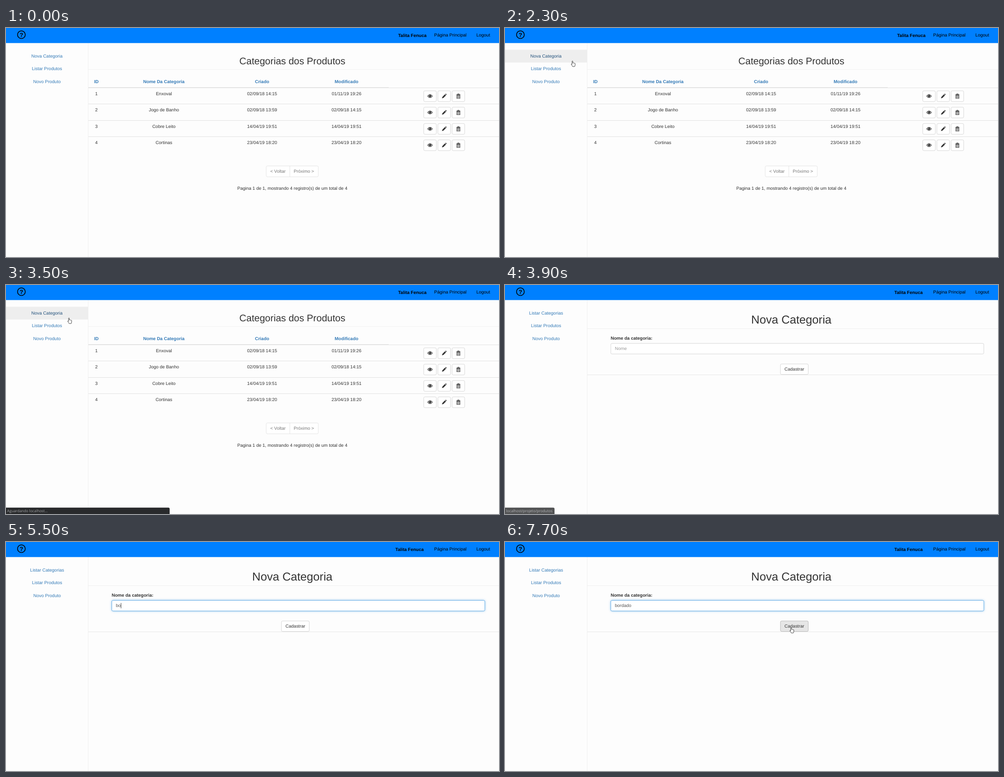
An HTML page for the animation above (8000 ms loop, 1095 px wide and 511 px high).

```html
<!DOCTYPE html>
<html lang="pt-BR">
<head>
<meta charset="utf-8">
<title>Categorias dos Produtos</title>
<style>
  html, body { margin: 0; width: 100%; height: 100%; overflow: hidden; background: #fdfdfd; }
  svg { display: block; width: 1095px; height: 511px; }
  text { font: 9.98px "Liberation Sans", Arial, sans-serif; fill: #333; text-rendering: geometricPrecision; white-space: pre; }
  .bold { font-weight: bold; }
  .mid { text-anchor: middle; }
  .link { fill: #337ab7; }
  .link.hover { fill: #23527c; }
  .nav { fill: #000; }
  .muted { fill: #777; }
  .h3 { font-size: 21.4px; }
  .h1 { font-size: 25.66px; }
  .box { fill: #fff; stroke: #ccc; stroke-width: .8; }
  .status { font: 8.2px "Open Sans", "Noto Sans", sans-serif; fill: #a4a6a9; }
  #focus { fill: #fff; stroke: #66afe9; filter: drop-shadow(0 0 2.8px rgba(102, 175, 233, .65)); }
</style>
</head>
<body>
<svg id="stage" viewBox="0 0 1095 511" xmlns="http://www.w3.org/2000/svg"></svg>
<script>
const LOOP = 8000, STEP = 100;

const text = (x, y, str, cls = '', id = '') =>
  `<text x="${x}" y="${y}" class="${cls}" id="${id}">${str}</text>`;
const rect = (x, y, w, h, attrs) =>
  `<rect x="${x}" y="${y}" width="${w}" height="${h}" ${attrs}/>`;
const box = (x, y, w, h, attrs = '') => rect(x, y, w, h, `rx="2.7" class="box" ${attrs}`);
const rule = (y, color, x = 182, w = 913, h = 1) => rect(x, y, w, h, `fill="${color}"`);

const sideLinks = (page, x, labels) => labels.map((label, i) =>
  rect(0, 48.5 + 28.5 * i, 182, 28.5, `fill="#eee" id="${page}Row${i}"`) +
  text(x, 65.7 + 28.5 * i, label, 'mid link', `${page}Link${i}`)).join('');

const icons = [
  `<path d="M-5.2 0Q0-7 5.2 0Q0 7-5.2 0Z" fill="#fff" stroke="#333" stroke-width="1.2"/>
   <circle r="2.7" cy="-.3" fill="#333"/><path d="M-1.4-.5Q-1.2-1.7 0-1.8" fill="none" stroke="#fff" stroke-width=".7"/>`,
  `<path d="M-5 5L-4 1.7L1.6-3.9L3.9-1.6L-1.7 4ZM2.3-4.6L3.1-5.3Q3.7-5.6 4.3-5L5-4.3Q5.6-3.7 5.2-3.1L4.6-2.3Z" fill="#333"/>`,
  `<path d="M-4.5-3.3H4.5M-1.6-3.6V-5H1.6V-3.6M-3.5-2.2V5H3.5V-2.2M-1.3-1.6V4M1.3-1.6V4M-3.5-2H3.5" fill="none" stroke="#333" stroke-width="1.1"/>`
];

const categories = [
  ['Enxoval', '02/09/18 14:15', '01/11/19 19:26'],
  ['Jogo de Banho', '02/09/18 13:59', '02/09/18 14:15'],
  ['Cobre Leito', '14/04/19 19:51', '14/04/19 19:51'],
  ['Cortinas', '23/04/19 18:20', '23/04/19 18:20']
];
const columns = [200.7, 350.7, 568.8, 756.3];
const cells = (values, y, cls) => values.map((v, i) => text(columns[i], y, v, cls)).join('');

const tableRow = (values, i) => {
  const y = 36.5 * i;
  const buttons = icons.map((icon, k) =>
    box(927.8 + 31.5 * k, 140.2 + y, 28, 24) +
    `<g transform="translate(${941.8 + 31.5 * k} ${152 + y})">${icon}</g>`).join('');
  return rule(133 + Math.floor(y), '#e1e1e1') + cells([i + 1, ...values], 149.7 + y, 'mid') + buttons;
};

const listPage = `<g id="list">
  ${sideLinks('list', 91, ['Nova Categoria', 'Listar Produtos', 'Novo Produto'])}
  ${text(871, 20, 'Talita Fenuca', 'bold nav')}
  ${text(636, 81.4, 'Categorias dos Produtos', 'mid h3')}
  ${rule(92, '#f1f1f1')}
  ${cells(['ID', 'Nome Da Categoria', 'Criado', 'Modificado'], 122.6, 'mid bold link')}
  ${categories.map(tableRow).join('')}
  ${rule(132.3, '#ddd', 182, 668, 1.4)}
  ${box(578, 307.8, 115.6, 24.2, 'style="stroke:#ddd"')}
  ${rule(308, '#ddd', 630, .8, 24)}
  ${text(587, 323.3, '&lt; Voltar', 'muted')}
  ${text(639, 323.3, 'Próximo &gt;', 'muted')}
  ${text(636, 360.8, 'Pagina 1 de 1, mostrando 4 registro(s) de um total de 4', 'mid')}
</g>`;

const formPage = `<g id="form">
  ${sideLinks('form', 91.3, ['Listar Categorias', 'Listar Produtos', 'Novo Produto'])}
  ${text(864.8, 20, 'Talita Fenuca', 'bold nav')}
  ${text(636, 86, 'Nova Categoria', 'mid h1')}
  ${rule(97, '#eee')}
  ${text(234.8, 122.3, 'Nome da categoria:', 'bold')}
  ${box(235, 130.3, 828.5, 23.6)}
  ${rect(235, 130.3, 828.5, 23.6, 'rx="2.7" id="focus"')}
  ${text(244, 145.3, '', '', 'field')}
  ${rect(244, 136, .9, 12, 'fill="#333" id="caret"')}
  ${rule(200, '#e6e6e6')}
  ${box(611.8, 176.2, 61.8, 23.4, 'id="submit"')}
  ${text(642.7, 190.8, 'Cadastrar', 'mid')}
</g>`;

const pointers = `
  <path id="arrow" d="M0 0V10L2.3 8L3.8 11.3L5.2 10.7L3.8 7.4H7Z" fill="#fff" stroke="#000" stroke-width=".7"/>
  <path id="hand" d="M-.9 1.2Q0-.5.9 1.2V5Q1.9 4.2 2.5 5.2Q3.6 4.5 4.1 5.6Q5.8 5 6 6.8V9Q5.9 10.8 4.9 13H.4Q-.8 10.8-2.5 8.6Q-3 7-1.8 7.2L-.9 8.2Z" fill="#fff" stroke="#222" stroke-width=".85"/>
  <path id="beam" d="M-2-5H2M0-5V5M-2 5H2" fill="none" stroke="#555" stroke-width=".7"/>`;

const stage = document.getElementById('stage');
stage.innerHTML = `
  ${rect(0, 0, 1095, 511, 'fill="#fdfdfd"')}
  ${listPage}${formPage}
  ${rule(34, '#f0f0f0', 182, 1, 477)}
  ${rect(0, 0, 1095, 33.6, 'fill="#0080ff" id="bar"')}
  <circle cx="34.2" cy="14.9" r="8.6" fill="none" stroke="#000" stroke-width="1.7"/>
  <text x="34.2" y="19.6" class="mid bold nav" style="font-size:13px">?</text>
  ${text(951, 19, 'Página Principal', 'nav')}${text(1044.7, 19, 'Logout', 'nav')}
  <g id="status"><path id="statusBar"/>${text(2.5, 507.4, '', 'status', 'statusText')}</g>
  ${pointers}`;

const el = Object.fromEntries([...stage.querySelectorAll('[id]')].map(n => [n.id, n]));
// The bar sits under both pages' user names.
stage.insertBefore(el.bar, el.list);

// Pointer path: time, x, y; straight between points, sampled every STEP.
const path = [
  [200, 87, 6], [400, 345, 103], [500, 447, 142], [600, 447, 142], [700, 453, 148], [900, 464, 159],
  [1300, 464, 159], [1400, 452, 153], [1600, 320, 118], [1800, 214, 91], [1900, 214, 91],
  [2000, 177, 82], [2100, 167, 76], [2200, 167, 76], [2300, 149.8, 73], [2800, 139.8, 73],
  [3600, 139.8, 73], [3700, 160, 92], [3800, 215, 118],
  [6700, 399, 147], [6800, 420, 160], [7000, 480, 182], [7200, 575, 197], [7300, 610, 198],
  [7400, 638, 194], [7500, 637, 192], [7700, 635.5, 190], [8000, 635.5, 190]
];

// Each table lists [start time, value]; a value holds until the next entry.
const pointerKinds = [[0, ''], [200, 'arrow'], [2000, 'hand'], [3800, 'arrow'], [3900, ''], [6700, 'beam'], [6800, 'arrow'], [7400, 'hand']];
const hovers = [[0, ''], [2000, 'list1'], [2300, 'list0'], [3600, 'form0'], [3700, 'form1'], [3800, '']];
const fieldTexts = [[0, 'Nome'], [5300, 'b'], [5500, 'bo'], [5600, 'bor'], [5800, 'bord'], [5900, 'bordad'], [6000, 'bordado']];
const carets = [[0, 0], [4300, 1], [4900, 0], [5300, 1], [6600, 0], [7100, 1], [7600, 0]];
const focusLevels = [[0, 0], [4300, .4], [4400, .85], [4500, 1]];
const link = 'localhost/projeto/categorias-produtos/add', waiting = 'Aguardando localhost...';
const statuses = [
  [0, null], [3000, [link, 171, .6]], [3100, [link, 171, 1]],
  [3400, [waiting, 171, 1]], [3500, [waiting, 363.5, 1]], [3600, null],
  [3700, ['localhost/projeto/produtos', 110, 1]], [3900, ['localhost/projeto/produtos', 110, .8]], [4000, null]
];

const at = (table, t) => table.findLast(([start]) => start <= t)[1];
const show = (node, on) => node.setAttribute('visibility', on ? 'inherit' : 'hidden');

function pointAt(t) {
  const i = path.findIndex(p => p[0] > t);
  if (i < 1) return path[0].slice(1);
  const [t0, x0, y0] = path[i - 1], [t1, x1, y1] = path[i];
  const k = (t - t0) / (t1 - t0);
  return [x0 + (x1 - x0) * k, y0 + (y1 - y0) * k];
}

function render(t) {
  const onForm = t >= 3600;
  show(el.list, !onForm);
  show(el.form, onForm);

  const hover = at(hovers, t);
  for (const page of ['list', 'form']) for (let i = 0; i < 3; i++) {
    const on = hover === page + i;
    show(el[`${page}Row${i}`], on);
    el[`${page}Link${i}`].classList.toggle('hover', on);
  }

  const typed = at(fieldTexts, t), typing = t >= 5300;
  el.field.textContent = typed;
  el.field.style.fill = typing ? '#555' : '#999';
  el.focus.style.opacity = at(focusLevels, t);
  el.caret.setAttribute('x', 244 + (typing && onForm ? el.field.getComputedTextLength() : 0));
  show(el.caret, onForm && at(carets, t));
  el.submit.style.fill = t >= 7400 ? '#e6e6e6' : '#fff';
  el.submit.style.stroke = t >= 7400 ? '#adadad' : '#ccc';

  const status = at(statuses, t);
  show(el.status, status);
  if (status) {
    const [label, width, opacity] = status;
    el.statusText.textContent = label;
    el.statusBar.setAttribute('d', `M0 496.7H${width - 3}q3 0 3 3V511H0Z`);
    el.statusBar.setAttribute('fill', '#292a2c');
    el.status.style.opacity = opacity;
  }

  const kind = at(pointerKinds, t), [x, y] = pointAt(t);
  for (const name of ['arrow', 'hand', 'beam']) {
    show(el[name], name === kind);
    el[name].setAttribute('transform', `translate(${x} ${y})`);
  }
}

const start = performance.now();
function tick() {
  const t = (performance.now() - start) % LOOP;
  render(Math.floor(t / STEP) * STEP);
  requestAnimationFrame(tick);
}
tick();
</script>
</body>
</html>
```
